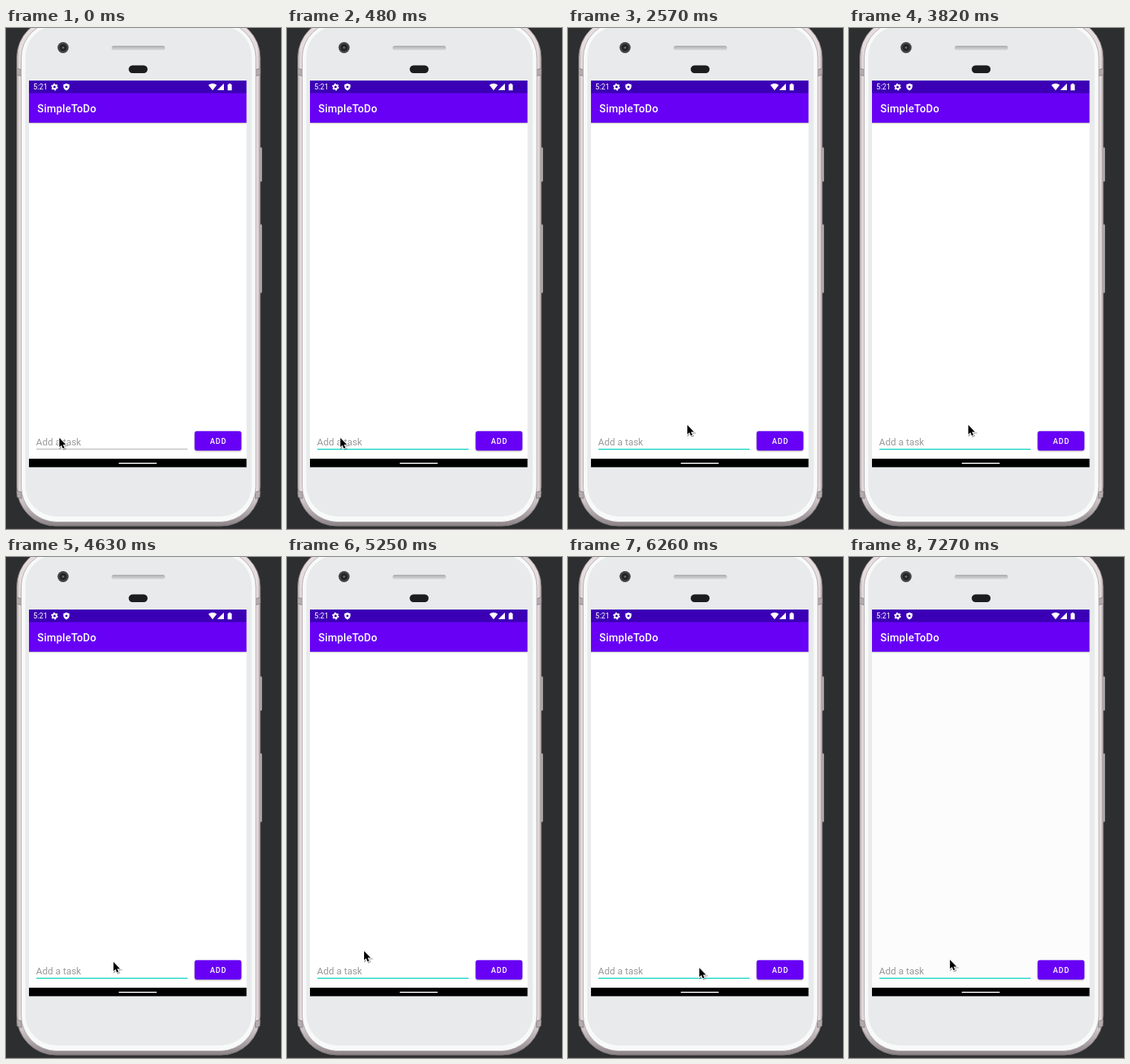
An HTML page that plays this animation: 371 px wide and 677 px high, repeating every 8 s.

```html
<!DOCTYPE html>
<html lang="en">
<head>
<meta charset="utf-8">
<title>To-do app</title>
<style>
  html, body { margin: 0; width: 371px; height: 677px; overflow: hidden; background: #2c2e30; }
  svg { display: block; font-family: Roboto, sans-serif; }
  #cursor { filter: drop-shadow(1px 1px .7px #0006); }
  #button { filter: drop-shadow(0 1px .8px #0005); }
</style>
</head>
<body>
<svg width="371" height="677" viewBox="0 0 371 677">
  <defs>
    <linearGradient id="metal">
      <stop offset="0" stop-color="#b5abad"/><stop offset=".012" stop-color="#e6dddf"/>
      <stop offset=".988" stop-color="#e6dddf"/><stop offset="1" stop-color="#b5abad"/>
    </linearGradient>
    <linearGradient id="shade" x2="0" y2="1">
      <stop offset=".93" stop-color="#756d70" stop-opacity="0"/>
      <stop offset="1" stop-color="#756d70" stop-opacity=".8"/>
    </linearGradient>
    <linearGradient id="grille" x2="0" y2="1">
      <stop offset="0" stop-color="#a9abac"/><stop offset="1" stop-color="#d9dbdc"/>
    </linearGradient>
    <linearGradient id="drop" x2="0" y2="1">
      <stop offset="0" stop-opacity=".25"/><stop offset="1" stop-opacity="0"/>
    </linearGradient>
    <g id="bands" fill="#b3abad" stroke="#81797b" stroke-width=".8">
      <path d="M14.5 54.5L21 56.5V65L14.5 63Z"/>
      <path d="M14.5 625.5L21 627V636L15 634Z"/>
    </g>
  </defs>

  <!-- Phone -->
  <path d="M0 676.5H371" stroke="#40363a"/>
  <g fill="#dcd9da" stroke="#8b8688" stroke-width=".8">
    <rect x="340" y="161.5" width="5" height="46" rx="1"/>
    <rect x="340" y="265.5" width="5" height="92.5" rx="1"/>
  </g>
  <g id="shell">
    <rect x="14.5" y="-13" width="328.5" height="686" rx="53" fill="url(#metal)" stroke="#817879"/>
    <rect x="14.5" y="-13" width="328.5" height="686" rx="53" fill="url(#shade)"/>
  </g>
  <use href="#bands"/>
  <use href="#bands" transform="matrix(-1 0 0 1 357.5 0)"/>
  <rect x="20.5" y="-8" width="316.5" height="675.5" rx="48" fill="#f8f9f9" stroke="#a69fa1" stroke-width=".8"/>
  <rect x="26" y="-3" width="305.5" height="663" rx="42" fill="#e8eaeb"/>
  <circle cx="77" cy="26.5" r="7.5" fill="#434547"/>
  <circle cx="77" cy="26.5" r="4.8" fill="#222426"/>
  <circle cx="77" cy="26.5" r="1.6" fill="#66696b"/>
  <rect x="142.5" y="24" width="72" height="6" rx="3" fill="url(#grille)"/>
  <rect x="165.5" y="50.5" width="25.5" height="10.5" rx="5.2" fill="#1c1d1f"/>

  <!-- Screen -->
  <rect id="page" x="31" y="71" width="293.5" height="522" fill="#fff"/>
  <rect x="31" y="128" width="293.5" height="2" fill="url(#drop)"/>
  <rect x="31" y="71" width="293.5" height="17" fill="#3b00b5"/>
  <rect x="31" y="88" width="293.5" height="40" fill="#6700f5"/>
  <g fill="#fff">
    <text x="36.8" y="83.4" font-size="10">5:21</text>
    <circle cx="65.5" cy="79.7" r="2.6" fill="none" stroke="#fff" stroke-width="2"/>
    <circle cx="65.5" cy="79.7" r="4" fill="none" stroke="#fff" stroke-width="1.5" stroke-dasharray="2.1 2.09"/>
    <path d="M81.5 75L85.6 76.5V79.6Q85.2 83 81.5 84.6Q77.8 83 77.4 79.6V76.5Z"/>
    <circle cx="81.5" cy="79.5" r="1.5" fill="#3b00b5"/>
    <path d="M273 77Q278.7 73 284.4 77L278.7 84.2Z"/>
    <path d="M294 75V84H285Z"/>
    <path d="M299 76.2H300.6V75H303V76.2H304.6V84.2H299Z"/>
    <text x="42.3" y="113.6" font-size="14.4" font-weight="500" letter-spacing=".2">SimpleToDo</text>
  </g>

  <!-- Entry row -->
  <text id="hint" x="40.6" y="563.6" font-size="12.9">Add a task</text>
  <rect id="line" x="41" y="568.6" width="204"/>
  <rect id="caret" x="40.4" y="550" width="1.5" height="17" fill="#14d4c2"/>
  <rect id="button" x="254.5" y="544.8" width="63" height="26.2" rx="3" fill="#6700f5"/>
  <text x="275.2" y="561.7" font-size="10" font-weight="500" letter-spacing=".9" fill="#fff">ADD</text>
  <rect x="31" y="582" width="293.5" height="11.5"/>
  <rect x="152" y="587.4" width="51.5" height="1.5" rx=".7" fill="#fff"/>

  <path id="cursor" d="M0 0V12.3L2.8 9.8L4.7 14.2L6.8 13.3L4.9 9.1H8.8Z"
    stroke="#fff" stroke-width="2" paint-order="stroke"/>
</svg>
<script>
  const LOOP = 8000, STEP = 150;
  const [page, hint, line, caret, cursor] =
    ['page', 'hint', 'line', 'caret', 'cursor'].map(id => document.getElementById(id));

  // Each glide ends at the given time and place, in jumps one STEP apart
  const glides = [
    { end: 0, x: 72, y: 554, jumps: 1 },
    { end: 1370, x: 108, y: 552.3, jumps: 2 },
    { end: 1670, x: 161, y: 536.6, jumps: 2 },
    { end: 4630, x: 145, y: 547.3, jumps: 1 },
    { end: 5110, x: 117, y: 559.5, jumps: 3 },
    { end: 5250, x: 104, y: 532.5, jumps: 1 },
    { end: 5400, x: 123, y: 473, jumps: 1 },
    { end: 5660, x: 150, y: 524, jumps: 1 },
    { end: 6260, x: 177.2, y: 555.3, jumps: 4 },
    { end: 6810, x: 134.3, y: 550, jumps: 2 },
    { end: 7270, x: 136.2, y: 544.3, jumps: 1 }
  ];

  function pointerAt(t) {
    let { x, y } = glides[0];
    for (const { end, jumps, ...to } of glides) {
      const done = jumps + Math.floor((t - end) / STEP);
      const part = Math.min(1, Math.max(0, done / jumps));
      x += (to.x - x) * part;
      y += (to.y - y) * part;
    }
    return [x, y];
  }

  const within = (t, from, to) => t >= from && t < to;

  function draw(t) {
    cursor.setAttribute('transform', `translate(${pointerAt(t)})`);

    const focused = t >= 480;
    line.setAttribute('height', focused ? 1.4 : .9);
    line.setAttribute('fill', focused ? '#14d4c2' : '#9b9b9b');

    hint.setAttribute('fill', within(t, 1080, 1520) ? '#747474' : '#999');
    caret.setAttribute('opacity', +(within(t, 1520, 2570) || within(t, 3160, 3820)));
    page.setAttribute('fill', t >= 7270 ? '#fcfcfc' : '#fff');
  }

  function tick() {
    draw(performance.now() % LOOP);
    requestAnimationFrame(tick);
  }
  tick();
</script>
</body>
</html>
```
